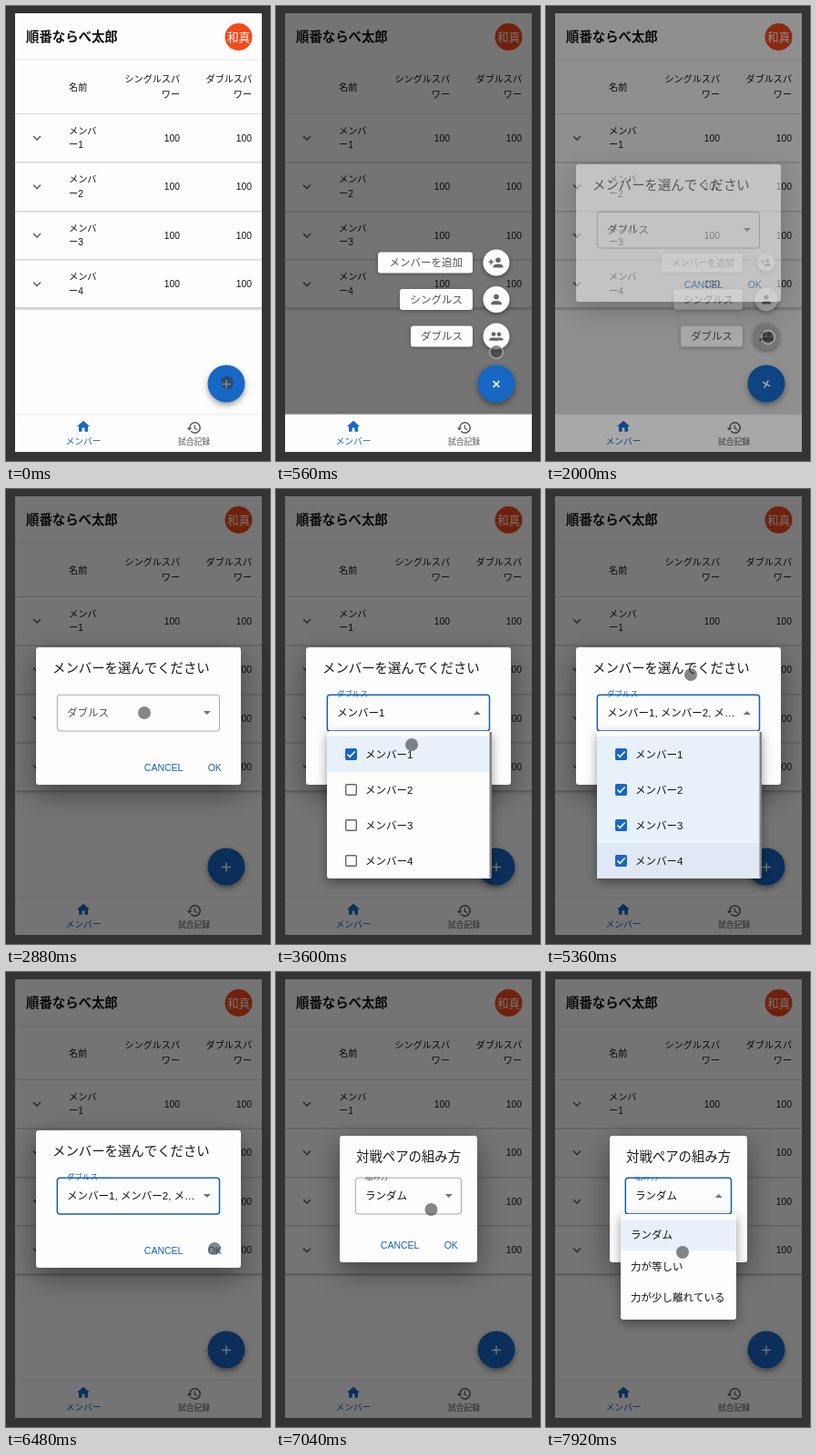
An HTML page with a canvas that plays this animation: 290 px wide and 500 px high, repeating every 8000 ms.

```html
<!DOCTYPE html>
<html lang="ja">
<head>
<meta charset="utf-8">
<style>
html, body { margin: 0; width: 100%; height: 100%; overflow: hidden; background: #343434; }
canvas { display: block; width: 290px; height: 500px; }
</style>
</head>
<body>
<canvas id="stage"></canvas>
<script>
const LOOP = 8000, STEP = 80, DIM = 0.54;
const BLUE = '#1767c5', DEEP = '#1760b0', GRAY = '#666', INK = '#121212', PICKED = '#e8f1fa';
const FONT = '"Liberation Sans", "Noto Sans CJK JP", "Noto Sans CJK", sans-serif';
const dpr = window.devicePixelRatio || 1;
const canvas = document.getElementById('stage');
const layer = document.createElement('canvas');
for (const el of [canvas, layer]) {
  el.width = 290 * dpr;
  el.height = 500 * dpr;
}
const main = canvas.getContext('2d'), sheet = layer.getContext('2d');
let c = main;

const clamp = v => Math.max(0, Math.min(1, v));
const ramp = (t, from, to) => clamp((t - from) / (to - from));
const ease = p => p * p * (3 - 2 * p);
const mix = (a, b, p) => a + (b - a) * p;

// Draws on a separate layer so that the parts fade as one
function group(alpha, draw) {
  if (alpha <= 0) return;
  sheet.setTransform(1, 0, 0, 1, 0, 0);
  sheet.clearRect(0, 0, layer.width, layer.height);
  sheet.setTransform(dpr, 0, 0, dpr, 0, 0);
  c = sheet;
  c.save();
  draw();
  c.restore();
  c = main;
  c.globalAlpha = alpha;
  c.drawImage(layer, 0, 0, 290, 500);
  c.globalAlpha = 1;
}

// y is the vertical middle of the glyphs
function text(s, x, y, size, color = INK, align = 'left', weight = '') {
  c.font = `${weight} ${size}px ${FONT}`;
  c.textAlign = align;
  c.fillStyle = color;
  c.fillText(s, x, y + size * 0.37);
}

function rect(x, y, w, h, color) {
  c.fillStyle = color;
  c.fillRect(x, y, w, h);
}

function disc(x, y, r, color) {
  c.fillStyle = color;
  c.beginPath();
  c.arc(x, y, r, 0, Math.PI * 2);
  c.fill();
}

function line(color, width, ...pts) {
  c.strokeStyle = color;
  c.lineWidth = width;
  c.beginPath();
  for (let i = 0; i < pts.length; i += 2) c.lineTo(pts[i], pts[i + 1]);
  c.stroke();
}

function shadowed(blur, dy, alpha, draw) {
  c.save();
  c.shadowColor = `rgba(0,0,0,${alpha})`;
  c.shadowBlur = blur * dpr;
  c.shadowOffsetY = dy * dpr;
  draw();
  c.restore();
}

function paper(x, y, w, h, blur, dy, alpha) {
  shadowed(blur, dy, alpha, () => {
    c.fillStyle = '#fdfdfd';
    c.beginPath();
    c.roundRect(x, y, w, h, 3);
    c.fill();
  });
}

function icon(path, x, y, color, size = 17) {
  c.save();
  c.translate(x - size / 2, y - size / 2);
  c.scale(size / 24, size / 24);
  c.fillStyle = color;
  c.fill(new Path2D(path));
  c.restore();
}

function person(x, y, k = 1) {
  disc(x, y - 2.9 * k, 2.9 * k, GRAY);
  c.beginPath();
  c.moveTo(x - 5.7 * k, y + 5.7 * k);
  c.lineTo(x - 5.7 * k, y + 4.2 * k);
  c.bezierCurveTo(x - 5.5 * k, y + 0.7 * k, x + 5.5 * k, y + 0.7 * k, x + 5.7 * k, y + 4.2 * k);
  c.lineTo(x + 5.7 * k, y + 5.7 * k);
  c.fill();
}

function history(x, y) {
  c.strokeStyle = '#555';
  c.lineWidth = 1.5;
  c.beginPath();
  c.arc(x + 1, y, 5.7, Math.PI, Math.PI * 2.78);
  c.stroke();
  c.fillStyle = '#555';
  c.beginPath();
  c.moveTo(x - 7.8, y);
  c.lineTo(x - 2.2, y);
  c.lineTo(x - 5, y + 2.9);
  c.fill();
  line('#555', 1.2, x + 0.8, y - 3, x + 0.8, y + 0.5, x + 3.6, y + 2.2);
}

function avatar() {
  disc(255.5, 34, 15, '#f4491a');
  text('和真', 255.5, 34, 12.6, '#fff', 'center');
}

function fab(turn) {
  shadowed(6, 3, 0.4, () => disc(242, 415, 20.5, BLUE));
  c.save();
  c.translate(242, 415.5);
  c.rotate(turn * Math.PI / 4);
  line('#fff', 1.5, -4.8, 0, 4.8, 0);
  line('#fff', 1.5, 0, -4.8, 0, 4.8);
  c.restore();
}

function page() {
  rect(10, 8, 271, 482, '#fdfdfd');
  text('順番ならべ太郎', 22, 33.5, 14.4, '#111', 'left', 'bold');
  rect(10, 58.5, 271, 1, '#e9e9e9');
  avatar();
  text('名前', 69, 89, 10.2);
  [['シングルスパ', 191], ['ダブルスパ', 270]].forEach(([s, x]) => {
    text(s, x, 80, 10.1, INK, 'right');
    text('ワー', x, 97.5, 10.1, INK, 'right');
  });
  rect(10, 118, 271, 1, '#d8d8d8');
  for (let i = 0; i < 4; i++) {
    const y = 145 + i * 53.5;
    line(GRAY, 1.6, 30, y - 2, 34, y + 2, 38, y - 2);
    text('メンバ', 69, y - 8, 10.2);
    text('ー' + (i + 1), 69, y + 7.5, 10.2);
    text('100', 191, y, 10.3, INK, 'right');
    text('100', 270, y, 10.3, INK, 'right');
    if (i < 3) rect(10, Math.round(y + 26), 271, 1.5, '#d6d6d6');
  }
  rect(10, 331, 271, 2, '#cfcfcf');
  rect(10, 333, 271, 1.5, '#e4e4e4');
}

function nav() {
  rect(10, 448.5, 271, 1, '#e2e2e2');
  rect(10, 449.5, 271, 40.5, '#fdfdfd');
  icon('M10 20v-6h4v6h5v-8h3L12 3 2 12h3v8z', 85, 462, BLUE);
  text('メンバー', 85, 478.5, 9.8, BLUE, 'center');
  history(206.5, 463.5);
  text('試合記録', 206.5, 478.5, 8.8, '#555', 'center');
}

const actions = [
  ['メンバーを追加', 282, 112, y => {
    person(244, y, 0.95);
    line(GRAY, 1.5, 233.5, y - 0.8, 239, y - 0.8);
    line(GRAY, 1.5, 236.2, y - 3.5, 236.2, y + 2);
  }],
  ['シングルス', 322.5, 136, y => person(242, y)],
  ['ダブルス', 363, 148, y => { person(245, y, 0.78); person(239, y, 0.82); }]
];

function dial(t) {
  actions.forEach(([label, y, left, glyph], i) => {
    const p = 1 - ramp(t, 1920 + i * 50, 2170 + i * 50);
    group(p, () => {
      c.save();
      c.translate(216, y);
      c.scale(0.55 + 0.45 * p, 0.75 + 0.25 * p);
      c.translate(-216, -y);
      paper(left, y - 11.5, 216 - left, 23, 4, 1, 0.3);
      text(label, 205, y, 11.5, '#555', 'right');
      c.restore();
      c.translate(242, y);
      c.scale(p, p);
      c.translate(-242, -y);
      shadowed(5, 2, 0.4, () => disc(242, y, 14.5, '#fdfdfd'));
      glyph(y);
      if (i === 2) disc(242, y, 14.5, `rgba(0,0,0,${0.3 * ramp(t, 1680, 1920)})`);
    });
  });
}

function fit(s, width) {
  c.font = `11.5px ${FONT}`;
  if (c.measureText(s).width <= width) return s;
  while (c.measureText(s + '…').width > width) s = s.slice(0, -1);
  return s + '…';
}

function select(x, w, label, value, lift, focus, open, clipTop) {
  const y = 226.2, h = 39.8, r = x + w;
  c.strokeStyle = focus ? DEEP : '#9c9c9c';
  c.lineWidth = focus ? 1.5 : 0.9;
  c.beginPath();
  c.roundRect(x, y, w, h, 3);
  c.stroke();
  c.save();
  if (clipTop) {
    c.beginPath();
    c.rect(x, 225.2, w, h);
    c.clip();
  }
  text(label, x + 10.7, mix(245.5, 224.8, lift), mix(11.5, 8.5, lift), focus ? DEEP : '#555');
  c.restore();
  text(fit(value, w - 37), x + 10.7, 246, 11.5);
  const d = open ? -1 : 1;
  c.fillStyle = '#757575';
  c.beginPath();
  c.moveTo(r - 17.8, 246 - 2 * d);
  c.lineTo(r - 9.6, 246 - 2 * d);
  c.lineTo(r - 13.7, 246 + 2 * d);
  c.fill();
}

function dialog(x, y, w, h, title, field) {
  paper(x, y, w, h, 30, 10, 0.42);
  text(title, x + 18, y + 22.5, 14.4, '#1a1a1a');
  field();
  text('CANCEL', x + w - 63.6, y + h - 19.3, 10.5, DEEP, 'right');
  text('OK', x + w - 21.2, y + h - 19.3, 10.5, DEEP, 'right');
}

function menu(p, x, w, h, items) {
  group(p, () => {
    c.translate(x, 266);
    c.scale(1, 0.75 + 0.25 * p);
    c.translate(-x, -266);
    paper(x, 266, w, h, 12, 4, 0.4);
    items();
  });
}

function checkbox(x, y, on) {
  c.beginPath();
  c.roundRect(x - 5.8, y - 5.8, 11.6, 11.6, 1);
  c.lineWidth = 1.4;
  c.strokeStyle = on ? BLUE : GRAY;
  c.stroke();
  if (!on) return;
  c.fillStyle = BLUE;
  c.fill();
  line('#fff', 1.5, x - 4, y, x - 1.3, y + 2.8, x + 4.2, y - 3);
}

const name = i => 'メンバー' + (i + 1);
const checkTimes = [3520, 4080, 4560, 4960];

function memberMenu(p, count) {
  menu(p, 56, 181, 162, () => {
    for (let i = 0; i < 4; i++) {
      const y = 291.5 + i * 39, on = i < count;
      if (on) rect(56, y - 19.5, 179, 39, i && i === count - 1 ? '#e1e8f5' : PICKED);
      checkbox(82.5, y, on);
      text(name(i), 98, y, 11.5);
    }
    rect(234.5, 267, 2.5, 160, '#818181');
  });
}

function pairMenu(p) {
  menu(p, 82, 127, 116, () => {
    rect(82, 272, 127, 34.5, PICKED);
    ['ランダム', '力が等しい', '力が少し離れている'].forEach((s, i) => text(s, 93, 289 + i * 34.6, 11.5));
  });
}

const path = [
  [0, 243, 414], [480, 243, 414], [560, 242, 380], [960, 242, 380], [1440, 244, 364],
  [2160, 244, 364], [2640, 152, 246], [3040, 152, 246], [3360, 149, 281], [3680, 149, 281],
  [4000, 150, 330], [4160, 150, 330], [4480, 150, 369], [4640, 150, 369], [4880, 151, 408],
  [5040, 151, 408], [5360, 159, 204], [5760, 159, 203], [6240, 229, 304], [6720, 229, 304],
  [7200, 150, 246], [7600, 150, 246], [7920, 150, 308], [8000, 150, 308]
];

function cursor(t) {
  const i = path.findIndex(k => k[0] > t);
  const [t0, x0, y0] = path[i - 1], [t1, x1, y1] = path[i];
  const p = ease(ramp(t, t0, t1));
  const x = mix(x0, x1, p), y = mix(y0, y1, p);
  disc(x, y, 7, 'rgba(55,55,55,.6)');
  if (t < 560 || t >= 2240) return;
  c.strokeStyle = 'rgba(225,225,225,.65)';
  c.lineWidth = 1.2;
  c.beginPath();
  c.arc(x, y, 7.3, 0, Math.PI * 2);
  c.stroke();
}

function draw(t) {
  c.setTransform(dpr, 0, 0, dpr, 0, 0);
  rect(0, 0, 290, 500, '#343434');
  page();

  const dialOpen = t >= 560 && t < 2300;
  if (dialOpen) rect(10, 8, 271, 441, `rgba(0,0,0,${DIM * (1 - ramp(t, 1840, 2060))})`);
  nav();
  fab(dialOpen ? 1 - ramp(t, 1920, 2145) : 0);
  if (dialOpen) dial(t);
  rect(10, 8, 271, 482, `rgba(0,0,0,${DIM * ramp(t, 1800, 2120)})`);

  const open1 = ramp(t, 3000, 3160) * (1 - ramp(t, 5560, 5760));
  const count = checkTimes.filter(k => t >= k).length;
  const value = Array.from({ length: count }, (_, i) => name(i)).join(', ');
  group(ramp(t, 1880, 2130) * (1 - ramp(t, 6560, 6800)), () =>
    dialog(33, 174, 225, 151, 'メンバーを選んでください', () =>
      select(56.3, 178.2, 'ダブルス', value, ramp(t, 3000, 3200), t >= 3000, open1 > 0.5)));
  memberMenu(open1, count);

  const open2 = ramp(t, 7480, 7640);
  group(ramp(t, 6580, 6820), () =>
    dialog(70, 180, 151, 139, '対戦ペアの組み方', () =>
      select(87.3, 116.2, '組み方', 'ランダム', 1, t >= 7480, open2 > 0.5, true)));
  pairMenu(open2);

  cursor(t);
}

const start = performance.now();
function tick() {
  const t = (performance.now() - start) % LOOP;
  draw(Math.floor(t / STEP) * STEP);
  requestAnimationFrame(tick);
}
tick();
</script>
</body>
</html>
```
